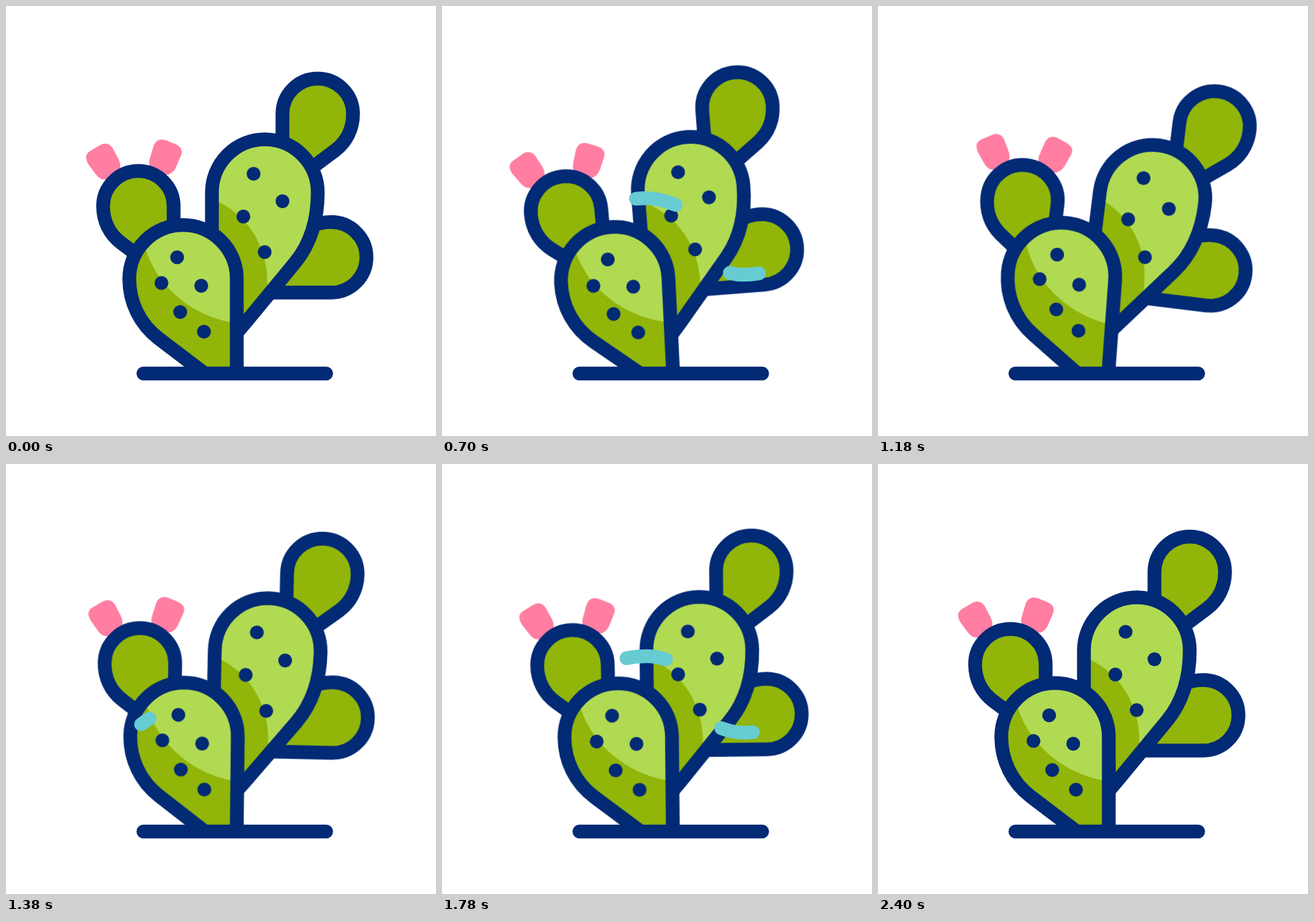
These frames come from a looping animation (640x640 px, 2.42 s). An HTML page:

```html
<!DOCTYPE html>
<html lang="en">
<head>
<meta charset="utf-8">
<title>Cactus in the wind</title>
<style>
  @property --head { syntax: "<number>"; inherits: false; initial-value: 0; }
  @property --tail { syntax: "<number>"; inherits: false; initial-value: 0; }

  :root {
    --navy: #022a75;
    --leaf: #91b508;
    --light: #b1da53;
    --loop: 2420ms;
    --ease: cubic-bezier(.3333, 0, .6667, 1);
  }
  html, body { margin: 0; width: 100%; height: 100%; overflow: hidden; background: #fff; }
  svg { display: block; width: 100%; height: 100%; }

  .pad { fill: var(--leaf); stroke: var(--navy); stroke-width: 20.5; }
  .outline { fill: none; stroke: var(--navy); stroke-width: 20.5; }
  .ground { fill: none; stroke: var(--navy); stroke-width: 20.5; stroke-linecap: round; }
  .leaf { fill: var(--leaf); }
  .light { fill: var(--light); }
  .flower { fill: #ff7ea2; }
  .dots { fill: var(--navy); }

  .sway { animation: sway var(--loop) var(--ease) infinite; }
  .front { transform-origin: 316px 537px; --right: 4.2deg; --left: -4.1deg; }
  .small { transform-origin: 279px 441px; --right: 7.1deg; --left: -7.3deg; }
  .back  { transform-origin: 329px 471px; --right: 7.1deg; --left: -6.5deg; }

  /* one swing every 400 ms */
  @keyframes sway {
    0%, 99.174%, 100% { transform: rotate(0deg); }
    16.529%, 49.587%, 82.645% { transform: rotate(var(--right)); }
    33.058%, 66.116% { transform: rotate(var(--left)); }
  }

  .wind {
    fill: none;
    stroke: #67cbd2;
    stroke-width: 20.5;
    stroke-linecap: round;
    visibility: hidden;
    stroke-dasharray: calc((var(--head) - var(--tail)) * 100px) 300px;
    stroke-dashoffset: calc(var(--tail) * -100px);
    animation: head var(--loop) var(--ease) var(--wait) infinite,
               tail var(--loop) var(--ease) var(--wait) infinite,
               show var(--loop) step-end var(--wait) infinite;
  }

  /* two gusts, 1100 ms apart; the tail follows the head by 80 ms */
  @keyframes head {
    0% { --head: 0; }
    24.793%, 45.454% { --head: 1; }
    45.455% { --head: 0; }
    70.248%, 100% { --head: 1; }
  }
  @keyframes tail {
    0%, 3.306% { --tail: 0; }
    28.099%, 45.454% { --tail: 1; }
    45.455%, 48.76% { --tail: 0; }
    73.554%, 100% { --tail: 1; }
  }
  @keyframes show {
    0%, 45.455% { visibility: visible; }
    28.099%, 73.554%, 100% { visibility: hidden; }
  }
</style>
</head>
<body>
<svg viewBox="0 0 640 640">
  <defs>
    <path id="frontPad" d="M343.5 547V406A80 80 0 0 0 183.5 406C183.5 441 199 473.5 227.4 495L295.8 547"/>
    <path id="backPad" d="M306.5 502V277.5A78.75 79 0 0 1 464 277.5C464 320 452.5 354.5 430.6 381.5L354.6 473.5L330 502"/>
    <path id="gust" pathLength="100" d="M201 323C229 303 264 286 304 286C356 286 402 335.5 448 335.5C464 335.5 480 332.5 494 328"/>
  </defs>

  <g class="sway back">
    <path class="pad" d="M390 426.5H484A52.5 52.5 0 0 0 484 321.5C474 321.5 462 324 452 328"/>
    <path class="pad" d="M411.5 235V160.5A52.5 52.5 0 0 1 516.5 160.5C516.5 182.5 506.8 202 489.8 215L441 251.5"/>
    <use href="#backPad" class="light"/>
    <path class="leaf" d="M306.5 287C360 309 390 358 389 415V430L330 502H306.5Z"/>
    <use href="#backPad" class="outline"/>
    <g class="dots">
      <circle cx="368.5" cy="249.8" r="10.3"/>
      <circle cx="411.5" cy="290.6" r="10.3"/>
      <circle cx="353.3" cy="313.4" r="10.3"/>
      <circle cx="385" cy="366.2" r="10.3"/>
    </g>
  </g>

  <g class="sway small">
    <path class="flower" d="M124 216.5L140 207Q151 201 158.5 211L168 229Q174 243 163 251L155 257Q142 262 134 251L123 236Q115 223 124 216.5Z"/>
    <path class="flower" d="M220 207Q225 196 237 199.5L252 205.5Q264 211 261 221L253 240Q247 253 235 251L222 247Q211 243 213.5 229Z"/>
    <path class="pad" d="M249.5 368V298A52.5 52.5 0 0 0 144.5 298C144.5 320 154.2 339.5 171.2 352.5L220 389"/>
  </g>

  <g class="sway front">
    <use href="#frontPad" class="leaf"/>
    <path class="light" d="M205 351.4C219 412 274 463 343.5 472V406A80 80 0 0 0 205 351.4Z"/>
    <use href="#frontPad" class="outline"/>
    <g class="dots">
      <circle cx="254.7" cy="374" r="10.3"/>
      <circle cx="231.4" cy="412.2" r="10.3"/>
      <circle cx="290.6" cy="416.4" r="10.3"/>
      <circle cx="259.3" cy="455.5" r="10.3"/>
      <circle cx="294.6" cy="484.8" r="10.3"/>
    </g>
  </g>

  <path class="ground" d="M204.5 547H476.5"/>

  <use href="#gust" class="wind" y="64.5" style="--wait: 200ms"/>
  <use href="#gust" class="wind" style="--wait: 400ms"/>
</svg>
</body>
</html>
```
